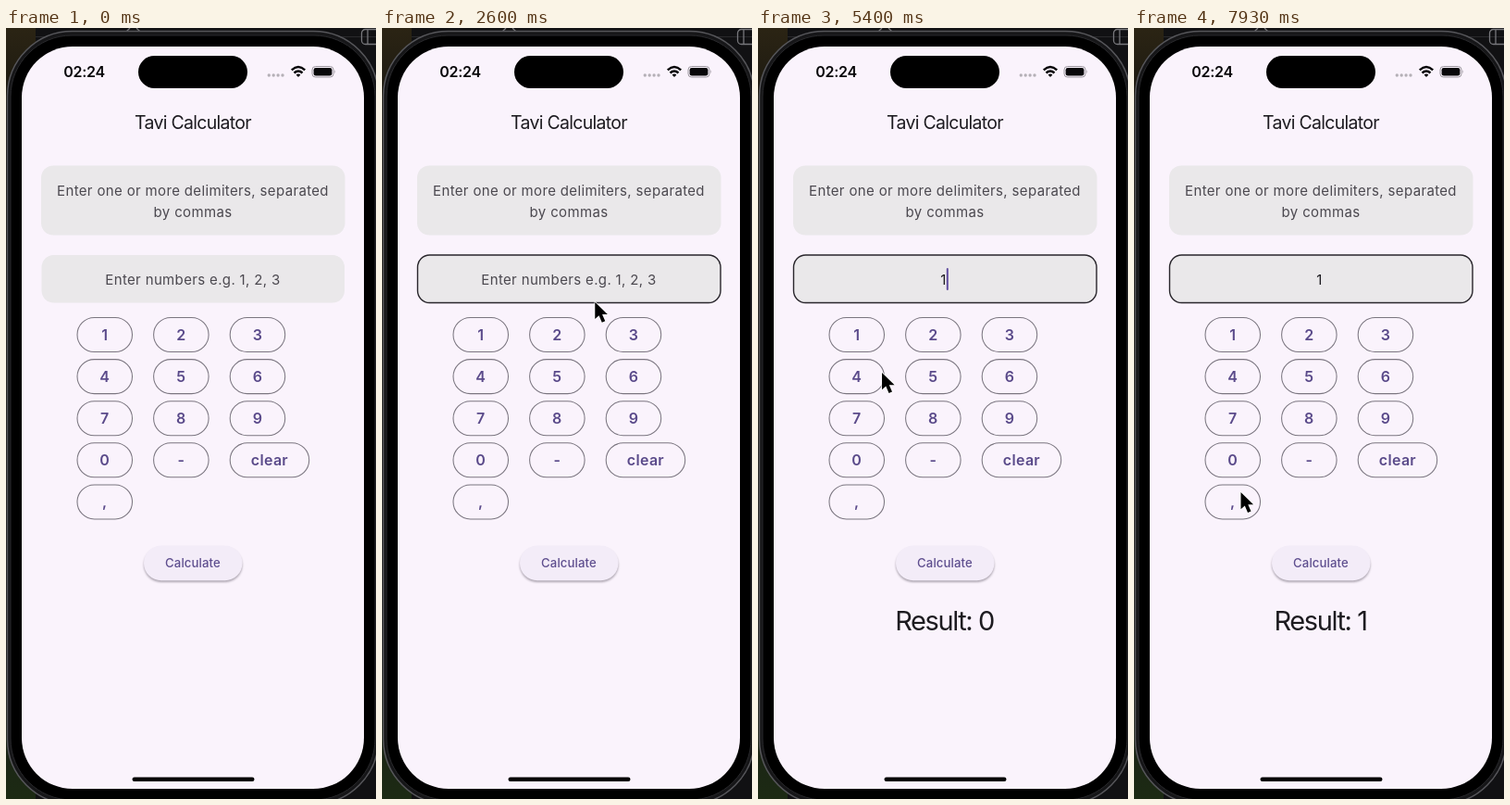
These frames come from a looping animation (400 px wide and 832 px high, 8 s). An HTML page:

```html
<!DOCTYPE html>
<html lang="en">
<head>
<meta charset="utf-8">
<title>Calculator</title>
<style>
  html, body { margin: 0; width: 100%; height: 100%; overflow: hidden; background: #111113; }
  svg { display: block; width: 400px; height: 832px; }
  text { font-family: Inter, "Open Sans", sans-serif; font-optical-sizing: none; text-anchor: middle; white-space: pre; }
  .time { font-size: 16px; font-weight: 600; letter-spacing: -.3px; fill: #08070a; }
  .title { font-size: 19.5px; letter-spacing: -.7px; fill: #1d1b20; }
  .field { fill: #eae8ea; }
  .hint, .typed { font-size: 15px; letter-spacing: .35px; fill: #4b484f; }
  .typed { fill: #1d1b20; }
  .key { fill: none; stroke: #7b7680; stroke-width: 1.05; }
  .label { font-size: 16px; font-weight: 600; letter-spacing: .3px; fill: #5a4a8a; }
  .calc { font-size: 13.2px; font-weight: 500; letter-spacing: .1px; fill: #5f4f8f; }
  .result { font-size: 29px; letter-spacing: -1.4px; fill: #1d1b20; }
</style>
</head>
<body>
<svg viewBox="0 0 400 832">
  <defs>
    <linearGradient id="wall" x2="0" y2="1">
      <stop offset="0" stop-color="#2b2414"/>
      <stop offset=".12" stop-color="#17150f"/>
      <stop offset=".8" stop-color="#1b1b1b"/>
      <stop offset="1" stop-color="#1c2a13"/>
    </linearGradient>
    <filter id="soft" x="-20%" y="-30%" width="140%" height="180%">
      <feGaussianBlur stdDeviation="1.1"/>
    </filter>
  </defs>

  <rect width="400" height="832" fill="#111113"/>
  <rect width="32" height="832" fill="url(#wall)"/>
  <path d="M32 9.5H400" stroke="#29292c"/>
  <g fill="none" stroke="#77777b" stroke-width="1.3">
    <rect x="384.5" y="1.5" width="22" height="16" rx="4"/>
    <path d="M391 2V17M130 4l4-4M141 0l4 4"/>
  </g>

  <rect x="1.5" y="3.5" width="401" height="834" rx="70" fill="#161618" stroke="#56565a" stroke-width="1.5"/>
  <rect x="5" y="8" width="394" height="825" rx="66" fill="#000" stroke="#29292c"/>
  <rect x="17" y="20" width="370" height="801" rx="55" fill="#faf3fc"/>
  <rect x="143" y="30" width="118" height="35" rx="17.5"/>
  <rect x="136.500" y="808.500" width="132" height="4.500" rx="2.250"/>

  <text class="time" x="84.5" y="53">02:24</text>
  <g fill="#b5b0b7" id="dots"></g>
  <g fill="none" stroke="#08070a" stroke-width="2.4">
    <path d="M308.800 45.300Q316 38.800 323.200 45.300"/>
    <path d="M311.500 48.500Q316 44.500 320.500 48.500"/>
  </g>
  <path d="M313.600 50.400Q316 48.500 318.400 50.400L316 53Z" fill="#08070a"/>
  <rect x="331" y="41.500" width="23" height="11.500" rx="3.600" fill="none" stroke="#9a959d"/>
  <rect x="332.600" y="43" width="19.800" height="8.500" rx="2.300" fill="#08070a"/>
  <path d="M355.500 45.300q1.600 2 0 4Z" fill="#9a959d"/>

  <text class="title" x="202" y="109.300">Tavi Calculator</text>
  <rect class="field" x="38" y="148.500" width="328.500" height="75" rx="13"/>
  <text class="hint" x="202" y="180.700">Enter one or more delimiters, separated</text>
  <text class="hint" x="202" y="203.500">by commas</text>
  <rect class="field" id="box" x="38.500" y="245" width="327.500" height="51.500" rx="13"/>
  <text class="hint" id="hint" x="202" y="276.500">Enter numbers e.g. 1, 2, 3</text>
  <text class="typed" id="typed" x="200.500" y="276.500">1</text>
  <rect id="caret" y="259" width="2" height="24" rx="1" fill="#5f4b9e"/>

  <g id="keys"></g>

  <rect x="149" y="561" width="106.500" height="37" rx="18.500" fill="#8d8592" opacity=".7" filter="url(#soft)"/>
  <rect x="149" y="558.500" width="106.500" height="37.800" rx="18.900" fill="#f3ecf8"/>
  <text class="calc" x="202" y="582.300">Calculate</text>
  <text class="result" id="result" x="201.500" y="650"></text>

  <path id="mouse" d="M0 0V18.200L4.300 14.500L7.500 22L11 20.500L7.800 13.200H13.600Z"
    stroke="#fff" stroke-width="1.300" stroke-linejoin="round" paint-order="stroke"/>
</svg>

<script>
const LOOP = 8000, STEP = 200 / 3;
const FOCUS = 1900, SUM_0 = 3600, TYPE = 5050, SUM_1 = 6080;

// Pointer stops: time, x, y
const stops = [
  [940, 392, 330], [1500, 233.5, 262], [2450, 233.5, 262],
  [3200, 202.5, 586], [3620, 202.5, 586], [4200, 119, 378],
  [4750, 112, 333], [5080, 112, 333], [5380, 134, 372],
  [5480, 134, 372], [5900, 204, 582], [6250, 204, 582],
  [6900, 136, 366], [7200, 136, 366], [7840, 115.5, 501]
];

const $ = id => document.getElementById(id);
const show = (el, on) => el.setAttribute('visibility', on ? 'visible' : 'hidden');
const clamp = v => Math.min(1, Math.max(0, v));
const ease = v => v * v * (3 - 2 * v);

function add(parent, tag, attrs, text = '') {
  const el = document.createElementNS('http://www.w3.org/2000/svg', tag);
  for (const k in attrs) el.setAttribute(k, attrs[k]);
  el.textContent = text;
  parent.append(el);
}

for (let i = 0; i < 4; i++) add($('dots'), 'circle', { cx: 284.3 + i * 4.9, cy: 51, r: 1.7 });

['1', '2', '3', '4', '5', '6', '7', '8', '9', '0', '-', 'clear', ','].forEach((name, i) => {
  const x = 77 + (i % 3) * 82.6, y = 312.5 + Math.floor(i / 3) * 45.1;
  const width = name === 'clear' ? 85.5 : 59.5;
  add($('keys'), 'rect', { class: 'key', x, y, width, height: 37, rx: 18.5 });
  add($('keys'), 'text', { class: 'label', x: x + width / 2, y: y + 24.2 }, name);
});

function pointer(t) {
  let i = 0;
  while (i < stops.length - 2 && t >= stops[i + 1][0]) i++;
  const [t0, x0, y0] = stops[i], [t1, x1, y1] = stops[i + 1];
  const p = ease(clamp((t - t0) / (t1 - t0)));
  return [x0 + (x1 - x0) * p, y0 + (y1 - y0) * p];
}

// Half a second on, half a second off, with a short fade at each turn
function blink(t) {
  const phase = t % 1000, fade = ease(clamp((phase % 500) / 200));
  if (t < 500) return 1;
  return phase < 500 ? fade : 1 - fade;
}

function draw(t) {
  const focused = t >= FOCUS, typed = t >= TYPE;
  $('box').setAttribute('stroke', focused ? '#29262c' : 'none');
  $('box').setAttribute('stroke-width', 1.4);
  show($('hint'), !typed);
  show($('typed'), typed);
  show($('caret'), focused);
  $('caret').setAttribute('x', typed ? 203.8 : 200.2);
  $('caret').setAttribute('opacity', focused ? blink(t - (typed ? TYPE : FOCUS)) : 0);
  $('result').textContent = t < SUM_0 ? '' : t < SUM_1 ? 'Result: 0' : 'Result: 1';
  show($('mouse'), t >= stops[0][0]);
  $('mouse').setAttribute('transform', `translate(${pointer(t)})`);
}

const start = performance.now();
function tick() {
  const t = (performance.now() - start) % LOOP;
  draw(Math.floor(t / STEP + .01) * STEP);
  requestAnimationFrame(tick);
}
tick();
</script>
</body>
</html>
```
